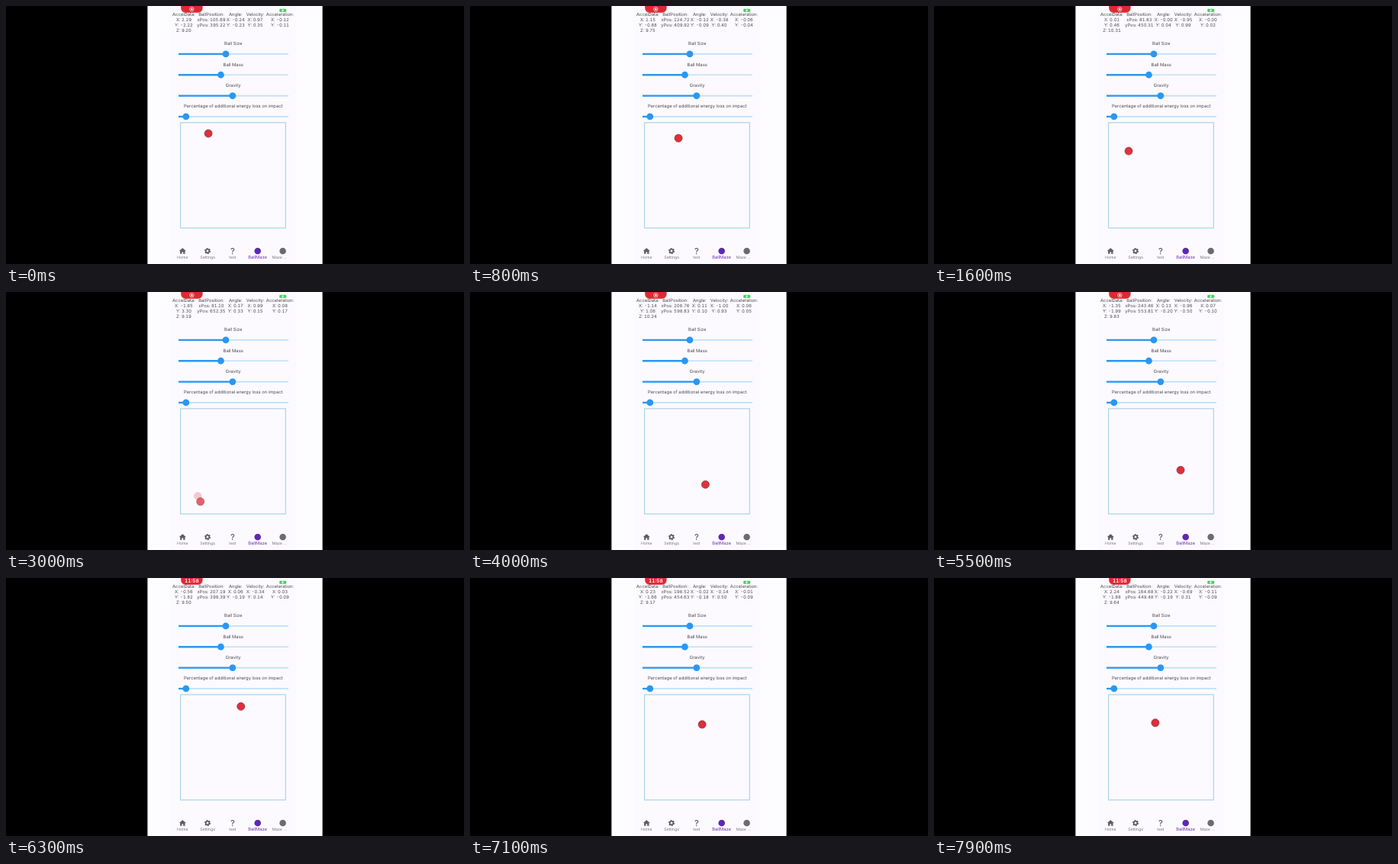
Recreate the animation shown at these times as an HTML page. Size 600 by 338 pixels, loop 8000 ms.

```html
<!DOCTYPE html>
<html lang="en">
<head>
<meta charset="utf-8">
<title>Tilt ball</title>
<style>
  html, body { margin: 0; width: 100%; height: 100%; overflow: hidden; background: #000; }
  svg { display: block; width: 100vw; height: 100vh; }
  text {
    font: 5.85px Inter, Roboto, sans-serif; font-variant-numeric: tabular-nums;
    text-rendering: geometricPrecision; fill: #4a484d; text-anchor: middle;
  }
  .tab { font-size: 5.15px; fill: #77757a; }
  .tab.on { font-size: 5.8px; fill: #6a30b6; }
  .clock { font-size: 6.6px; font-weight: 600; fill: #fff; }
  .ask { font-size: 11px; font-weight: 500; fill: #5f5e62; }
</style>
</head>
<body>
<svg viewBox="0 0 600 338">
  <rect width="600" height="338"/>
  <rect x="185.4" width="229.2" height="338" fill="#fdfcfe"/>
  <rect x="214" width="166" height="338" fill="#fcfafe"/>

  <g id="readout"></g>
  <g id="sliders"></g>

  <rect x="229.2" y="-6" width="28.4" height="14.8" rx="6" fill="#de2932"/>
  <g id="rec" fill="none" stroke="#fff">
    <circle cx="243.3" cy="4.2" r="2.7" stroke-width=".7"/>
    <circle cx="243.3" cy="4.2" r="1.2" fill="#fff" stroke="none"/>
  </g>
  <text id="clock" class="clock" x="243.3" y="6.4">11:58</text>
  <rect x="358.2" y="3.8" width="9" height="4" rx="1.2" fill="#3fd257"/>
  <path d="M361.6 4.4h1.8v2.8h-1.8z" fill="#f0faf0"/>

  <rect x="228.6" y="152.8" width="137.7" height="138" fill="none" stroke="#a8d4ea" stroke-width="1.2"/>
  <circle id="ghost" r="5.2" fill="#d92d3b"/>
  <circle id="ball" r="5" fill="#df2f3b" stroke="#7c2a35" stroke-width=".7"/>

  <g fill="#5f5e62">
    <path d="M231.3 317l-4.5 4.1h1.3v3.7h2.3v-2.6h1.8v2.6h2.3v-3.7h1.3z"/>
    <circle cx="264" cy="321" r="2.3" fill="none" stroke="#5f5e62" stroke-width="1.7"/>
    <circle cx="264" cy="321" r="3.5" fill="none" stroke="#5f5e62" stroke-width="1.2" stroke-dasharray="1.83"/>
    <text class="ask" x="297" y="325">?</text>
    <circle cx="329.7" cy="321" r="4.3" fill="#5f28b2"/>
    <circle cx="362.6" cy="321" r="4.3" fill="#6c6a6e"/>
  </g>
  <g id="tabs"></g>
</svg>
<script>
const LOOP = 8000, STEP = 100, TICK = 1000 / 60;
const $ = id => document.getElementById(id);

function add(parent, tag, attrs, text = '') {
  const el = document.createElementNS('http://www.w3.org/2000/svg', tag);
  for (const k in attrs) el.setAttribute(k, attrs[k]);
  el.textContent = text;
  return parent.appendChild(el);
}

function addSlider(label, row, share) {
  const g = $('sliders'), cy = 62.9 + 27.35 * row, x = 226 + 144 * share;
  add(g, 'text', { x: 297.7, y: cy - 11.7 }, label);
  add(g, 'path', { d: `M226 ${cy}H370`, stroke: '#bfe0fa', 'stroke-width': 1.7 });
  add(g, 'path', { d: `M226 ${cy}H${x}`, stroke: '#2b97f0', 'stroke-width': 2.3 });
  add(g, 'circle', { cx: x, cy, r: 4.4, fill: '#2b97f0' });
}
addSlider('Ball Size', 0, .43);
addSlider('Ball Mass', 1, .385);
addSlider('Gravity', 2, .492);
addSlider('Percentage of additional energy loss on impact', 3, .068);

['Home', 'Settings', 'test', 'BallMaze', 'Maze ...'].forEach((name, i) => add($('tabs'), 'text',
  { x: 231.3 + 32.75 * i - (i > 3 ? 4.3 : 0), y: 331.3, class: i === 3 ? 'tab on' : 'tab' }, name));

// Each column returns a function that fills in its values
function addColumn(title, x, ...prefixes) {
  add($('readout'), 'text', { x, y: 12.7 }, title);
  const cells = prefixes.map((_, i) => add($('readout'), 'text', { x, y: 19.7 + 7.1 * i }));
  return (...values) => values.forEach((v, i) => cells[i].textContent = prefixes[i] + v.toFixed(2));
}
const showTilt = addColumn('AccelData:', 233, 'X: ', 'Y: ', 'Z: ');
const showPlace = addColumn('BallPosition:', 269, 'xPos: ', 'yPos: ');
const showAngle = addColumn('Angle:', 300.8, 'X: ', 'Y: ');
const showSpeed = addColumn('Velocity:', 326.6, 'X: ', 'Y: ');
const showAccel = addColumn('Acceleration:', 359, 'X: ', 'Y: ');

// Key points: places are unfolded, running on through the walls; speeds are per tick
const keys = [
  { t: 0, tilt: [2.29, -2.22, 9.2], at: [105.69, 395.22], v: [1.33, .36] },
  { t: 1600, tilt: [.01, .46, 10.31], at: [81.83, 450.31], v: [-1.25, 1.43] },
  { t: 3000, tilt: [-1.65, 3.3, 9.19], at: [-17.1, 652.35], v: [-1.43, 2.99] },
  { t: 4000, tilt: [-1.14, 1.06, 10.24], at: [-144.76, 759.17], v: [-4.71, -1.2] },
  { t: 5500, tilt: [-1.35, -1.99, 9.83], at: [-359.54, 804.19], v: [-1.29, 2.62] },
  { t: 7100, tilt: [.23, -1.66, 9.17], at: [-404.48, 1064.63], v: [-.14, .52] },
  { t: 7900, tilt: [2.24, -1.88, 9.64], at: [-438.32, 1059.48], v: [-.76, .31] }
];
const walls = [[32, 333.5], [374, 679]];

// Reflect an unfolded place and speed between two walls
function fold([p, v], [lo, hi]) {
  const w = hi - lo, q = (((p - lo) % (2 * w)) + 2 * w) % (2 * w);
  return q > w ? [lo + 2 * w - q, -v] : [lo + q, v];
}

function hermite(p, q, m, n, u) {
  const d = q - p, c2 = 3 * d - 2 * m - n, c3 = m + n - 2 * d;
  return [p + u * (m + u * (c2 + u * c3)), m + u * (2 * c2 + 3 * u * c3)];
}

function stateAt(t) {
  const i = Math.max(1, keys.findIndex(k => k.t >= t));
  const a = keys[i - 1], b = keys[i], u = (t - a.t) / (b.t - a.t), ticks = (b.t - a.t) / TICK;
  const [x, y] = walls.map((wall, k) => {
    const [p, d] = hermite(a.at[k], b.at[k], a.v[k] * ticks, b.v[k] * ticks, u);
    return fold([p, d / ticks], wall);
  });
  return { x, y, tilt: a.tilt.map((v, k) => v + (b.tilt[k] - v) * u) };
}

function place(id, { x, y }, opacity) {
  $(id).setAttribute('cx', 220.6 + .4207 * x[0]);
  $(id).setAttribute('cy', 1.6 + .4185 * y[0]);
  $(id).setAttribute('opacity', opacity);
}

function draw(t) {
  const now = stateAt(t), { x, y, tilt } = now;
  const pull = Math.hypot(...tilt), ax = -tilt[0] / pull, ay = tilt[1] / pull;
  showTilt(...tilt);
  showPlace(x[0], y[0]);
  showAngle(ax, ay);
  showSpeed(Math.sin(x[1]), Math.sin(y[1]));
  showAccel(ax / 2, ay / 2);

  // A fast fall leaves an afterimage
  const fade = .25 * Math.min(1, Math.max(0, y[1] / 3) ** 3);
  place('ghost', stateAt(Math.max(0, t - STEP)), fade);
  place('ball', now, 1 - fade);

  const clockOn = t >= 6300;
  $('clock').setAttribute('opacity', +clockOn);
  $('rec').setAttribute('opacity', +!clockOn);
}

const start = performance.now();
function tick(now) {
  const t = Math.max(0, now - start) % LOOP;
  draw(Math.floor(t / STEP) * STEP);
  requestAnimationFrame(tick);
}
draw(0);
requestAnimationFrame(tick);
</script>
</body>
</html>
```
